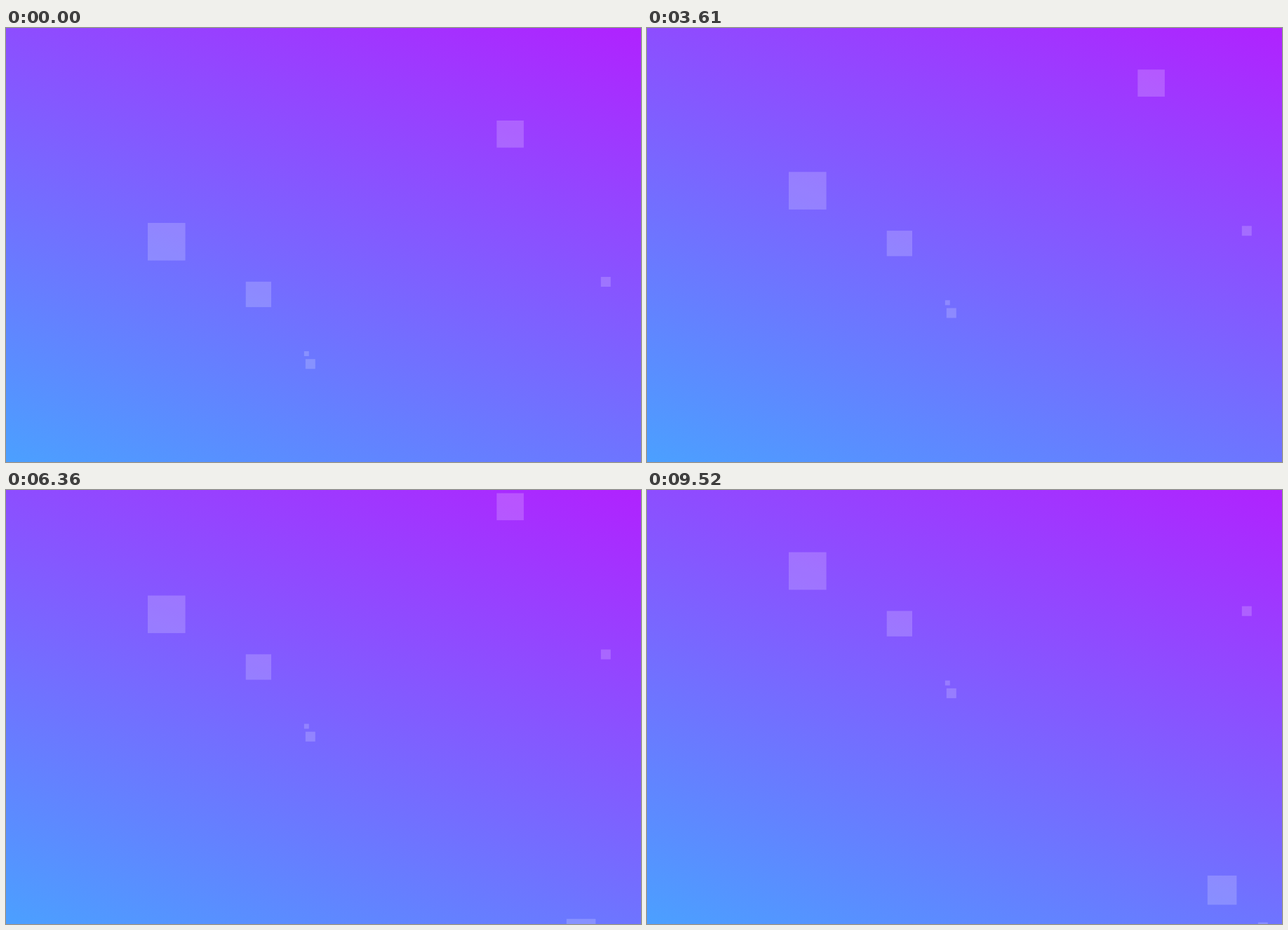
Recreate the animation shown at these times as an HTML page. Size 905 by 619 pixels, loop 9580 ms.

```html
<!DOCTYPE html>
<html lang="en">
<head>
<meta charset="utf-8">
<title>Rising squares</title>
<style>
  html, body { margin: 0; width: 100%; height: 100%; overflow: hidden; }
  #stage {
    display: block;
    width: 905px;
    height: 619px;
    background: linear-gradient(20deg, #4ba0ff, #b022ff);
  }
</style>
</head>
<body>
<svg id="stage" viewBox="0 0 905 619"><g id="squares" fill="#fff" fill-opacity="0.19"></g></svg>
<script>
const LOOP = 9580;
const SPEED = 0.0197; // px per ms
const STEP = 69;      // ms between pictures
const SLOW_STEP = 71.3;
const LEAD = 120;     // ms gained at the pause
const PAUSE = { from: 1920, to: 2430 };

const group = document.getElementById("squares");

function addSquare(x, y, size) {
  const rect = document.createElementNS(group.namespaceURI, "rect");
  const box = { x, y, width: size, height: size };
  for (const name in box) rect.setAttribute(name, box[name]);
  group.append(rect);
}

addSquare(202, 278, 53.6);
addSquare(341.7, 361.8, 36.3);
addSquare(699.3, 132, 38.6);
addSquare(847.8, 355, 14);
addSquare(426.8, 472.2, 14);
addSquare(424.8, 461, 7);
addSquare(798.8, 739.2, 41.6);
addSquare(870.8, 806, 14);

const snap = (time, origin, step) => origin + Math.floor((time - origin) / step) * step;

// The squares rise in small steps, jump ahead once and wait there.
function pictureTime(time) {
  if (time < PAUSE.from) return Math.max(0, snap(time, 60, STEP));
  if (time < PAUSE.to) return (PAUSE.from + PAUSE.to) / 2;
  return snap(time, PAUSE.to, SLOW_STEP) + LEAD;
}

const start = performance.now();

function draw(now) {
  const time = Math.max(0, now - start) % LOOP;
  group.setAttribute("transform", `translate(0 ${-SPEED * pictureTime(time)})`);
  requestAnimationFrame(draw);
}

draw(start);
</script>
</body>
</html>
```
